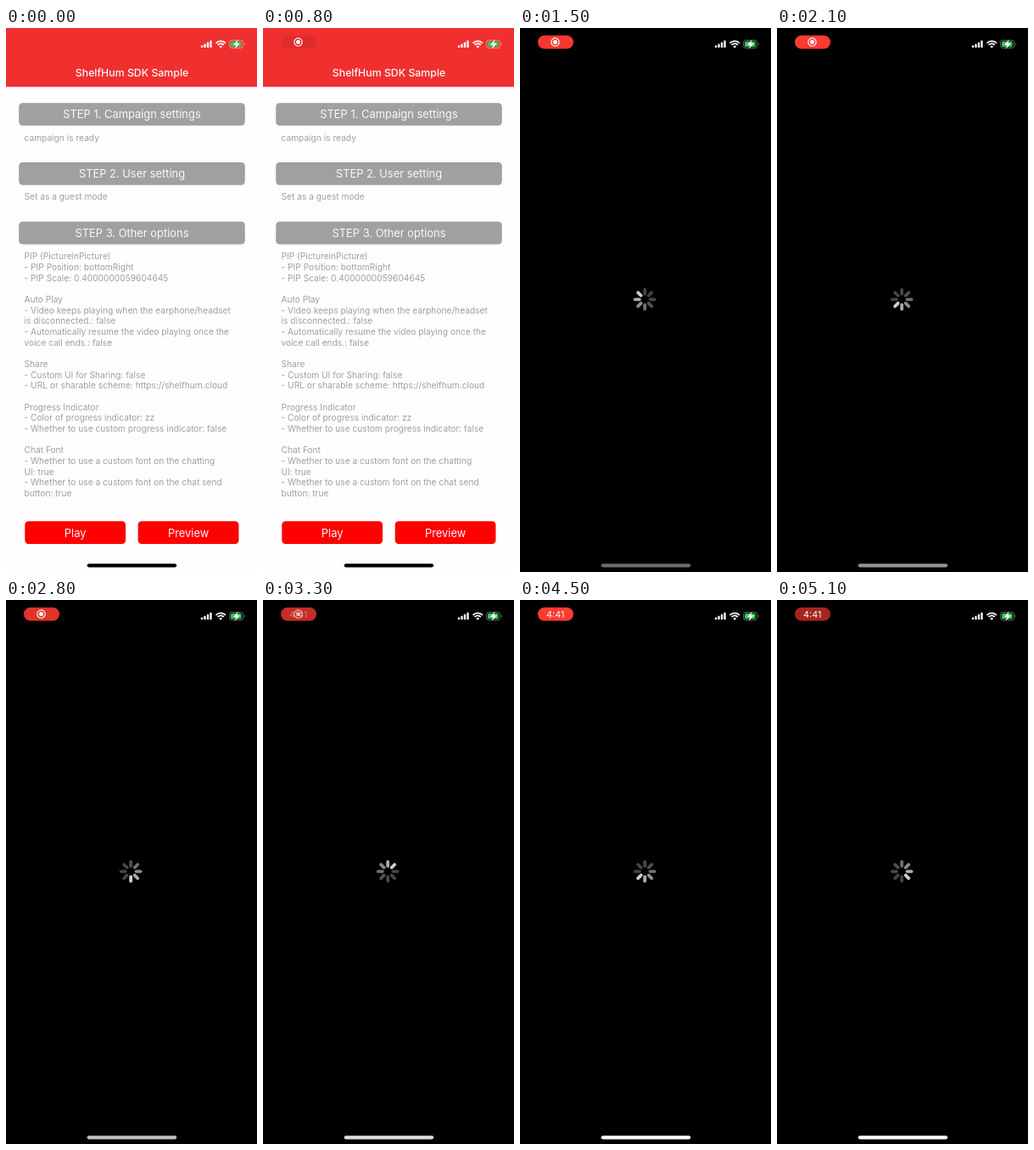
Animation, 296 px wide and 640 px high, one loop 5200 ms. Source, as an HTML page:

```html
<!DOCTYPE html>
<html lang="en">
<head>
<meta charset="utf-8">
<style>
  html, body { margin: 0; width: 100%; height: 100%; overflow: hidden; background: #fffdff; }
  svg { display: block; font-family: Inter, "Liberation Sans", sans-serif; }
  .title { font-size: 12.9px; fill: #fbf6fb; text-anchor: middle; }
  .body { font-size: 10.2px; fill: #a19ea1; white-space: pre; }
</style>
</head>
<body>
<svg width="296" height="640" viewBox="0 0 296 640">
  <rect width="296" height="640" fill="#000"/>
  <g id="settings">
    <rect width="296" height="640" fill="#fffdff"/>
    <rect width="296" height="69.3" fill="#ef302f"/>
    <text class="title" x="148.5" y="57" style="font-size:12.3px;font-weight:500">ShelfHum SDK Sample</text>
  </g>
  <g id="spinner" transform="translate(147.2 319.3)" stroke-width="3.8" stroke-linecap="round"></g>

  <g id="status">
    <rect id="pill" x="21" y="8.7" width="42" height="15.8" rx="7.9"/>
    <g id="record">
      <circle cx="41.5" cy="16.6" r="4.7" fill="none" stroke="#fff" stroke-width="1.1"/>
      <circle cx="41.5" cy="16.6" r="2.5" fill="#fff"/>
    </g>
    <text id="clock" class="title" x="41.7" y="20.5" style="font-size:10.9px">4:41</text>
    <path d="M231 20.5V23M234.5 18.8V23M238 16.8V23M241.5 14.8V23" stroke="#fff" stroke-width="2.3"/>
    <g fill="none" stroke="#fff" stroke-width="1.8">
      <path d="M247.5 17.8a8 8 0 0 1 11.4 0M249.6 20a5 5 0 0 1 7.2 0"/>
      <path d="M253.2 23.8l-1.9-2.1a2.8 2.8 0 0 1 3.8 0z" fill="#fff" stroke="none"/>
    </g>
    <rect x="263.6" y="14.4" width="16" height="9.2" rx="2.7" fill="none" stroke="#fff" stroke-opacity=".4"/>
    <rect x="265" y="15.8" width="12.6" height="6.4" rx="1.5" fill="#34c759"/>
    <path d="M281 17.5a1.6 1.6 0 0 1 0 3z" fill="#fff" fill-opacity=".4"/>
    <path d="M273.6 13.4l-5.6 6.6h3.3l-1.5 4.7 6-6.8h-3.5z" fill="#fff"/>
  </g>
  <rect id="home" x="95.7" y="630.2" width="105.5" height="4.2" rx="2.1"/>
</svg>
<script>
const LOOP = 5200, OPENED = 900, STEP = 100;
const $ = id => document.getElementById(id);
const clamp = v => Math.min(1, Math.max(0, v));

function add(parent, tag, attrs, text = '') {
  const el = document.createElementNS('http://www.w3.org/2000/svg', tag);
  for (const key in attrs) el.setAttribute(key, attrs[key]);
  el.textContent = text;
  return $(parent).appendChild(el);
}

function box(x, y, width, fill, label) {
  const rect = add('settings', 'rect', { x, y, width, height: 26.6, rx: 4.2, fill });
  add('settings', 'text', { class: 'title', x: x + width / 2, y: y + 18.2 }, label);
  return rect;
}

const line = (y, text) => add('settings', 'text', { class: 'body', x: 21.5, y }, text);

box(15.2, 88.2, 266.6, '#a19fa1', 'STEP 1. Campaign settings');
line(132.6, 'campaign is ready');
box(15.2, 158.1, 266.6, '#a19fa1', 'STEP 2. User setting');
line(202.4, 'Set as a guest mode');
box(15.2, 227.8, 266.6, '#a19fa1', 'STEP 3. Other options');
`PIP (PictureinPicture)
- PIP Position: bottomRight
- PIP Scale: 0.4000000059604645

Auto Play
- Video keeps playing when the earphone/headset
is disconnected.: false
- Automatically resume the video playing once the
voice call ends.: false

Share
- Custom UI for Sharing: false
- URL or sharable scheme: https://shelfhum.cloud

Progress Indicator
- Color of progress indicator: zz
- Whether to use custom progress indicator: false

Chat Font
- Whether to use a custom font on the chatting
UI: true
- Whether to use a custom font on the chat send
button: true`.split('\n').forEach((text, i) => line(272.4 + i * 12.66, text));
const play = box(22.3, 580.3, 118.8, '#fd0000', 'Play');
box(155.7, 580.3, 118.8, '#fd0000', 'Preview');

const spokes = Array.from({ length: 8 }, (_, i) =>
  add('spinner', 'path', { d: 'M0-6.4V-11.4', transform: `rotate(${i * 45})` }));
const greys = [208, 174, 142, 112, 82, 72, 70, 70];

function draw(t) {
  const opened = t >= OPENED;
  $('settings').style.display = opened ? 'none' : '';
  $('spinner').style.display = opened ? '' : 'none';
  play.setAttribute('fill', t >= 300 && t < 600 ? '#d00000' : '#fd0000');

  // The recording pill dims once every two seconds.
  const dip = (1 - Math.cos(2 * Math.PI * clamp((t % 2000 - 600) / 1000))) / 2;
  const red = opened ? [255, 59, 48] : [239, 48, 47];
  const depth = opened ? 0.35 : 0.22;
  $('pill').setAttribute('fill', `rgb(${red.map(c => Math.round(c * (1 - depth * dip)))})`);

  const toClock = clamp((t - 3200) / 300);
  $('record').setAttribute('opacity', clamp(t / 400) * (1 - toClock));
  $('clock').setAttribute('opacity', toClock);

  const head = Math.floor(t / STEP);
  spokes.forEach((spoke, i) => {
    const grey = greys[(head - i + 8) % 8];
    spoke.setAttribute('stroke', `rgb(${grey},${grey - 2},${grey})`);
  });

  const glow = opened ? Math.min(255, 72 + (t - OPENED) * 0.063) : 0;
  $('home').setAttribute('fill', `rgb(${glow},${glow},${glow})`);
}

function tick() {
  draw(Math.floor(performance.now() % LOOP / STEP) * STEP);
  requestAnimationFrame(tick);
}
tick();
</script>
</body>
</html>
```
